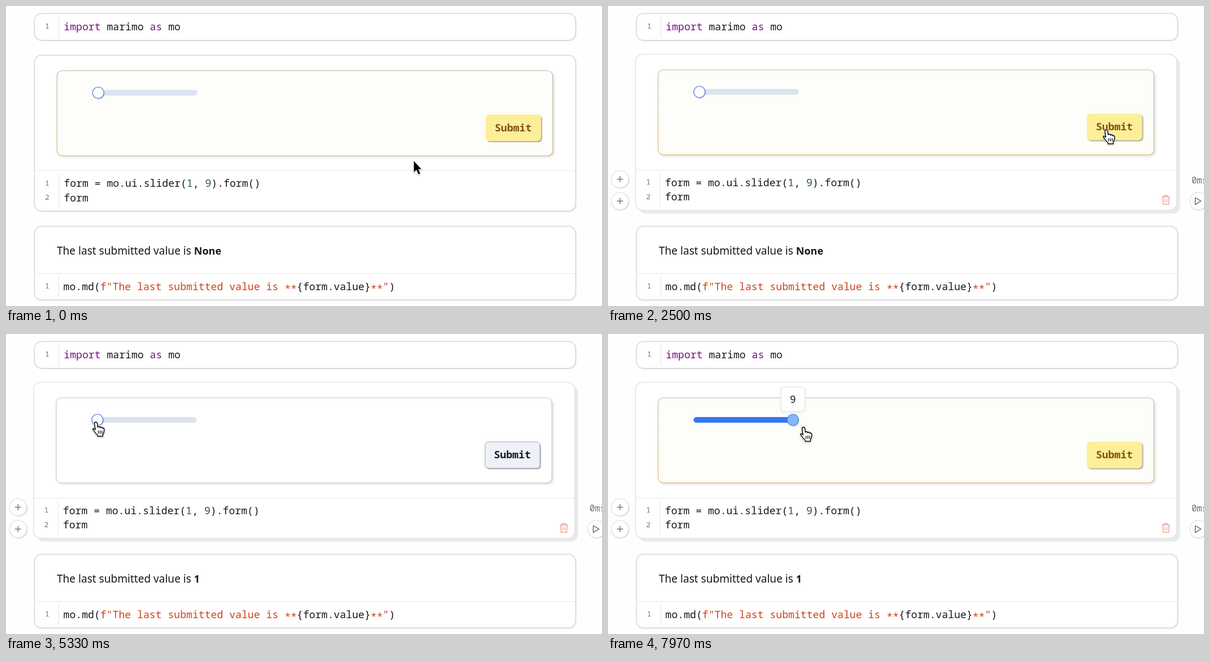
These frames come from a looping animation (1055 by 531 pixels, 8000 ms). An HTML page with a canvas:

```html
<!DOCTYPE html>
<html lang="en">
<head>
<meta charset="utf-8">
<title>Form demo</title>
<style>
html, body { margin: 0; width: 100%; height: 100%; overflow: hidden; background: #fff; }
canvas { display: block; width: 1055px; height: 531px; }
</style>
</head>
<body>
<canvas id="stage"></canvas>
<script>
const W = 1055, H = 531, LOOP = 8000;
const FOCUS = 2100, SUBMIT = 2950, RESULT = 3450, PRESS = 5800;
const MONO = '"Noto Sans Mono", monospace';
const SANS = '"Noto Sans", sans-serif';
const INK = '#14171f', STRING = '#cb4419', KEYWORD = '#75127f', NUMBER = '#26564f';

const canvas = document.getElementById('stage');
const ctx = canvas.getContext('2d');
const dpr = window.devicePixelRatio || 1;
canvas.width = W * dpr;
canvas.height = H * dpr;

// Pointer path: time, x, y and whether the leg ending here is eased
const path = [
  [0, 722, 274.5], [200, 722, 274.5], [1500, 872.5, 225.5, 1], [2000, 872.5, 225.5],
  [2500, 882, 219, 1], [3850, 882, 219], [5195, 159, 156, 1],
  [6170, 159, 156], [6970, 239, 158], [7970, 346, 165], [8000, 346, 165]
];

function pointerAt(t) {
  const i = Math.max(1, path.findIndex(p => p[0] > t));
  const [t0, x0, y0] = path[i - 1], [t1, x1, y1, eased] = path[i];
  let u = (t - t0) / (t1 - t0);
  if (eased) u = u * u * (3 - 2 * u);
  return { x: x0 + (x1 - x0) * u, y: y0 + (y1 - y0) * u };
}

function shadow(color, dx, dy, blur) {
  ctx.shadowColor = color;
  ctx.shadowOffsetX = dx * dpr;
  ctx.shadowOffsetY = dy * dpr;
  ctx.shadowBlur = blur * dpr;
}

function paint(fill, stroke, width = 1) {
  if (fill) { ctx.fillStyle = fill; ctx.fill(); }
  ctx.shadowColor = 'transparent';
  if (stroke) { ctx.strokeStyle = stroke; ctx.lineWidth = width; ctx.stroke(); }
}

function box(x, y, w, h, r, fill, stroke, width) {
  ctx.beginPath();
  ctx.roundRect(x, y, w, h, r);
  paint(fill, stroke, width);
}

function disc(x, y, r, fill, stroke, width) {
  ctx.beginPath();
  ctx.arc(x, y, r, 0, 7);
  paint(fill, stroke, width);
}

function line(color, width, ...pts) {
  ctx.beginPath();
  pts.forEach(([x, y], i) => i ? ctx.lineTo(x, y) : ctx.moveTo(x, y));
  paint(null, color, width);
}

function text(s, x, y, font, color, align = 'left') {
  ctx.font = font;
  ctx.fillStyle = color;
  ctx.textAlign = align;
  ctx.fillText(s, x, y);
  return x + ctx.measureText(s).width;
}

// Alternating strings and colours on one code line; asterisks sit at mid-height
function code(x, y, ...parts) {
  for (let i = 0; i < parts.length; i += 2)
    for (const run of parts[i].match(/\*+|[^*]+/g))
      x = text(run, x, run[0] === '*' ? y + 3.5 : y, '18.14px ' + MONO, parts[i + 1]);
}

function lineNo(n, y) {
  text(n, 73, y, '13px ' + MONO, '#707276', 'center');
}

function card(y, h, raised) {
  if (raised) shadow('#e9e9e9', 6, 6, 1);
  else shadow('rgba(0,0,0,.16)', 1, 1, 2);
  box(50.25, y, 958, h, 13, '#fff', raised ? '#e2e2e3' : '#d8d8d9', 1.5);
}

function importCell() {
  card(13.25, 47.5);
  line('#e3e3e3', 1, [93.5, 18], [93.5, 55]);
  lineNo('1', 39.5);
  code(102.3, 42.5, 'import', KEYWORD, ' marimo ', INK, 'as', KEYWORD, ' mo', INK);
}

function resultCell(value) {
  card(389.75, 130.5);
  const x = text('The last submitted value is ', 90, 439.7, '19.06px ' + SANS, INK);
  text(value, x, 439.7, 'bold 18px ' + SANS, INK);
  line('#e8e8e8', 1, [51, 473.5], [1007, 473.5]);
  line('#e3e3e3', 1, [93.5, 478], [93.5, 515]);
  lineNo('1', 500);
  code(101.5, 503, 'mo.md(', INK, 'f"The last submitted value is **', STRING,
    '{form.value}', INK, '**"', STRING, ')', INK);
}

function slider(value, active) {
  const x = 163.3 + (value - 1) * 20.69;
  box(153, 148.5, 186, 10, 5, '#dde3ef');
  if (value > 1) box(153, 148.5, x - 153, 10, 5, '#3675f3');
  shadow('rgba(20,40,80,.3)', 1, 1.5, 2);
  disc(x, 153.5, 10, active ? '#82b7f9' : '#fff', active ? '#4f83d3' : '#4d7fd0', 1.2);
  if (!active) return;
  shadow('rgba(30,40,70,.12)', 0, 1, 4);
  box(x - 21, 95.5, 42, 43, 5, '#fff', '#e2e6ee', 1.2);
  text(value, x, 123, '17.5px ' + MONO, INK, 'center');
}

function formBox(dirty, hot) {
  let edge = '#c4c6ca';
  if (dirty) {
    edge = ctx.createLinearGradient(0, 114, 0, 265);
    edge.addColorStop(0, '#bdb9ae');
    edge.addColorStop(.6, '#c9ba90');
    edge.addColorStop(1, '#d8b66c');
  }
  shadow('rgba(0,0,0,.12)', 3, 3, 4);
  box(90.25, 114.5, 877.5, 150.5, 9, dirty ? '#fdfdf9' : '#fff', edge, 1.2);

  shadow(dirty ? '#b5b1a3' : '#b4b5b8', 2, 2, 1);
  if (dirty) box(849, 192, 98, 47, 6, '#fdee98');
  else box(849.5, 192.5, 97, 46.5, 6, hot ? '#f5f8fc' : '#eef1f8', '#a2a6ad');
  text('Submit', 865.2, 221.5, '600 18.14px ' + MONO, dirty ? '#805012' : '#151a24');
}

function formCell(s) {
  ctx.save();
  if (s.focused) ctx.translate(-1.5, -1.5);
  card(87, 276, s.focused);
  formBox(s.dirty, s.hot);
  slider(s.value, s.dragging);
  line('#e8e8e8', 1, [51, 291.5], [1007, 291.5]);
  line('#e3e3e3', 1, [93.75, 297], [93.75, 357]);
  lineNo('1', 317.5);
  lineNo('2', 343);
  code(102.3, 320, 'form = mo.ui.slider(', INK, '1', NUMBER, ', ', INK, '9', NUMBER, ').form()', INK);
  code(102.3, 345.5, 'form', INK);
  ctx.restore();
}

function roundButton(x, y) {
  shadow('rgba(0,0,0,.2)', 1, 1, 2);
  disc(x, y, 15.3, '#fff', '#dcdcdd', 1.1);
}

function cellTools() {
  for (const y of [306.5, 345.3]) {
    roundButton(21.3, y);
    line('#686b70', 1.3, [15.8, y], [26.8, y]);
    line('#686b70', 1.3, [21.3, y - 5.5], [21.3, y + 5.5]);
  }
  text('0ms', 1033, 313.5, '15.6px ' + MONO, '#6d7075');
  roundButton(1045, 345.3);
  line('#55585e', 1.3, [1039.5, 339.3], [1039.5, 351.3], [1049.5, 345.3], [1039.5, 339.3]);

  const red = '#e9958a';
  line(red, 1.3, [980.5, 338], [994.5, 338]);
  line(red, 1.3, [984.5, 338], [984.5, 335.3], [990.5, 335.3], [990.5, 338]);
  line(red, 1.3, [982, 338], [982.5, 350.8], [992.5, 350.8], [993, 338]);
  line(red, 1.2, [985.7, 341.5], [985.7, 347.5]);
  line(red, 1.2, [989.3, 341.5], [989.3, 347.5]);
}

const arrow = new Path2D('M0 0V19.6L4.6 15.4 7.9 23.2 11.1 21.9 7.9 14.3H13.2Z');
const hand = new Path2D('M-2.5 2.5Q-2.5 0 0 0Q2.3 0 2.6 2.5L3.4 9Q3.9 7.8 5.6 7.8' +
  'Q7.3 8 7.6 10Q8 8.6 9.6 8.8Q11.3 9 11.5 11Q12 9.9 13.2 10.2Q14.8 10.7 14.8 13' +
  'L14.5 17Q14 19.5 12.5 21.5L12.3 25H3.2L2.8 22.5Q-1 19.5-3.2 15.5' +
  'Q-5.6 12.8-5 11.8Q-3.8 10.3-1.2 13.2L-.9 13.3Z');

function pointer({ x, y }, isHand) {
  const shape = isHand ? hand : arrow;
  ctx.save();
  ctx.translate(x, y);
  ctx.lineJoin = 'round';
  ctx.strokeStyle = '#fff';
  ctx.lineWidth = isHand ? 3.2 : 2.6;
  shadow('rgba(0,0,0,.3)', 0, 1, 2.5);
  ctx.stroke(shape);
  ctx.shadowColor = 'transparent';
  ctx.fillStyle = isHand ? '#fff' : '#000';
  ctx.fill(shape);
  if (isHand) {
    ctx.strokeStyle = '#000';
    ctx.lineWidth = 1.5;
    ctx.stroke(shape);
    for (const lx of [4.6, 7.7, 10.8]) line('#000', 1.2, [lx, 15], [lx, 20.5]);
  }
  ctx.restore();
}

function draw(t) {
  const p = pointerAt(t);
  const focused = t >= FOCUS;
  const dragging = t >= PRESS;
  const value = dragging ? Math.min(9, 1 + Math.round((p.x - 159) / 20.69)) : 1;
  const hot = focused && p.x > 847;

  ctx.setTransform(dpr, 0, 0, dpr, 0, 0);
  ctx.fillStyle = '#fefefe';
  ctx.fillRect(0, 0, W, H);
  importCell();
  formCell({ focused, dragging, value, hot, dirty: t < SUBMIT || value > 1 });
  if (focused) cellTools();
  resultCell(t < RESULT ? 'None' : '1');
  pointer(p, hot || dragging || (focused && p.x < 172));
}

const start = performance.now();
function tick() {
  draw((performance.now() - start) % LOOP);
  requestAnimationFrame(tick);
}
tick();
</script>
</body>
</html>
```
